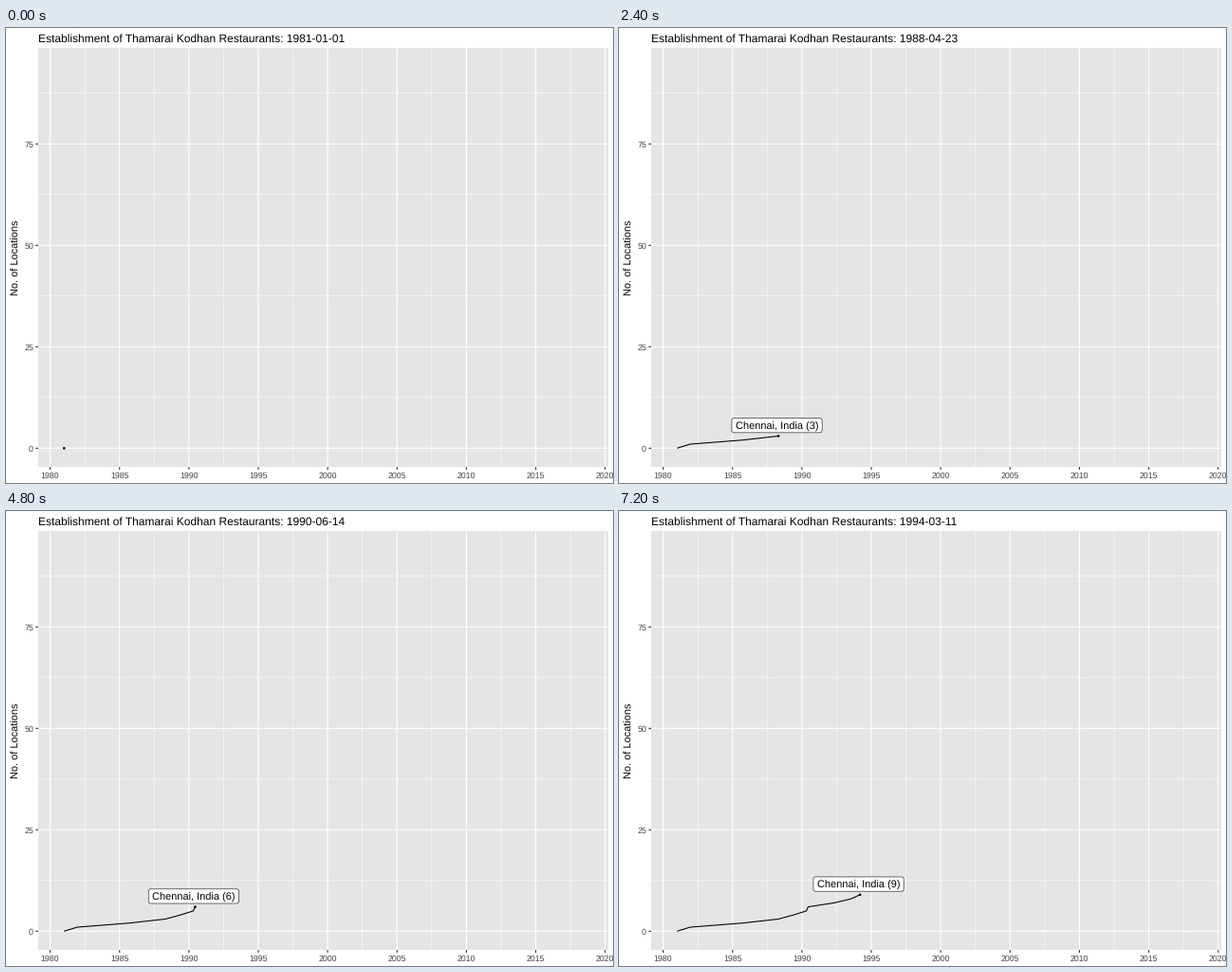
Recreate the animation shown at these times as a matplotlib script. Size 640 by 480 pixels, loop 8000 ms.

```python
import numpy as np
import matplotlib.pyplot as plt
from matplotlib.animation import FuncAnimation
from matplotlib.patches import Circle, FancyBboxPatch, Rectangle

plt.rcParams["font.family"] = "Liberation Sans"
plt.rcParams["text.hinting"] = "no_hinting"

W, H, DPI = 640, 480, 80
PT = 72 / DPI  # points per pixel
LEFT, TOP, RIGHT, BOTTOM = 34, 21.1, 634.5, 463.2
X_1980, PX_YEAR = 46.55, 14.63
Y_ZERO, PX_UNIT = 443.3, 4.28
BOX_W, BOX_H, PAD = 95.2, 15.2, 3.6

# One opening per step; the n-th date brings the total to n.
DATES = ["1981-01-01", "1981-12-14", "1985-09-14", "1988-04-23", "1989-05-19",
         "1990-04-28", "1990-06-14", "1992-05-07", "1993-07-22", "1994-03-11"]


def x_of(date):
    days = (np.datetime64(date) - np.datetime64("1980-01-01")).astype(int)
    return X_1980 + days / 365.25 * PX_YEAR


def y_of(count):
    return Y_ZERO - count * PX_UNIT


def line(xs, ys, color, width, z):
    return ax.plot(xs, ys, color=color, lw=width * PT, zorder=z, snap=False,
                   solid_capstyle="butt")[0]


def text(x, y, s, size, color="black", ha="left", **kw):
    return ax.text(x, y, s, fontsize=size * PT, color=color, ha=ha,
                   va="baseline", zorder=9, **kw)


fig = plt.figure(figsize=(W / DPI, H / DPI), dpi=DPI, facecolor="white")
ax = fig.add_axes([0, 0, 1, 1])
ax.set_xlim(0, W)
ax.set_ylim(H, 0)
ax.axis("off")

ax.add_patch(Rectangle((LEFT, TOP), RIGHT - LEFT, BOTTOM - TOP,
                       fc="#E5E5E5", ec="none", zorder=0))

# Minor grid
for year in np.arange(1982.5, 2020, 5):
    x = X_1980 + (year - 1980) * PX_YEAR
    line([x, x], [TOP, BOTTOM], "white", 0.53, 1)
for count in np.arange(12.5, 90, 25):
    line([LEFT, RIGHT], [y_of(count)] * 2, "white", 0.53, 1)

# Major grid, ticks and tick labels
for year in range(1980, 2021, 5):
    x = x_of(f"{year}-01-01")
    line([x, x], [TOP, BOTTOM], "white", 1.07, 2)
    line([x, x], [BOTTOM, BOTTOM + 2.75], "#2B2B2B", 1.07, 3)
    text(x, 474.8, str(year), 8.8, "#444444", "center")
for count in range(0, 76, 25):
    y = y_of(count)
    line([LEFT, RIGHT], [y, y], "white", 1.07, 2)
    line([LEFT - 2.75, LEFT], [y, y], "#2B2B2B", 1.07, 3)
    text(29, y + 3.15, str(count), 8.8, "#444444", "right")

text(13.6, 242.3, "No. of Locations", 11, ha="center", rotation=90,
     rotation_mode="anchor")
title = text(LEFT - 0.2, 15, "", 12)

xs = [x_of(d) for d in DATES]
ys = [y_of(n) for n in range(len(DATES))]
trail = line([], [], "black", 1.07, 5)
dot = ax.add_patch(Circle((0, 0), 1.3, fc="black", ec="none", zorder=6))
box = ax.add_patch(FancyBboxPatch(
    (0, 0), BOX_W, BOX_H, boxstyle="round,pad=0,rounding_size=2.16",
    fc="white", ec="black", lw=0.55 * PT, zorder=7, snap=False))
label = text(0, 0, "", 11.04, ha="center")


def draw(n):
    x, y = xs[n], ys[n]
    title.set_text(f"Establishment of Thamarai Kodhan Restaurants: {DATES[n]}")
    trail.set_data(xs[:n + 1], ys[:n + 1])
    dot.center = (x, y)
    # The label keeps clear of the panel's left edge.
    cx = max(x - 1.6, 90.3)
    bottom = y - PAD
    box.set_bounds(cx - BOX_W / 2, bottom - BOX_H, BOX_W, BOX_H)
    label.set_position((cx, bottom - PAD))
    label.set_text(f"Chennai, India ({n})")
    for part in (box, label):
        part.set_visible(n > 0)
    return title, trail, dot, box, label


anim = FuncAnimation(fig, draw, frames=len(DATES), interval=800,
                     repeat=True, repeat_delay=0, blit=False)
plt.show()
```
